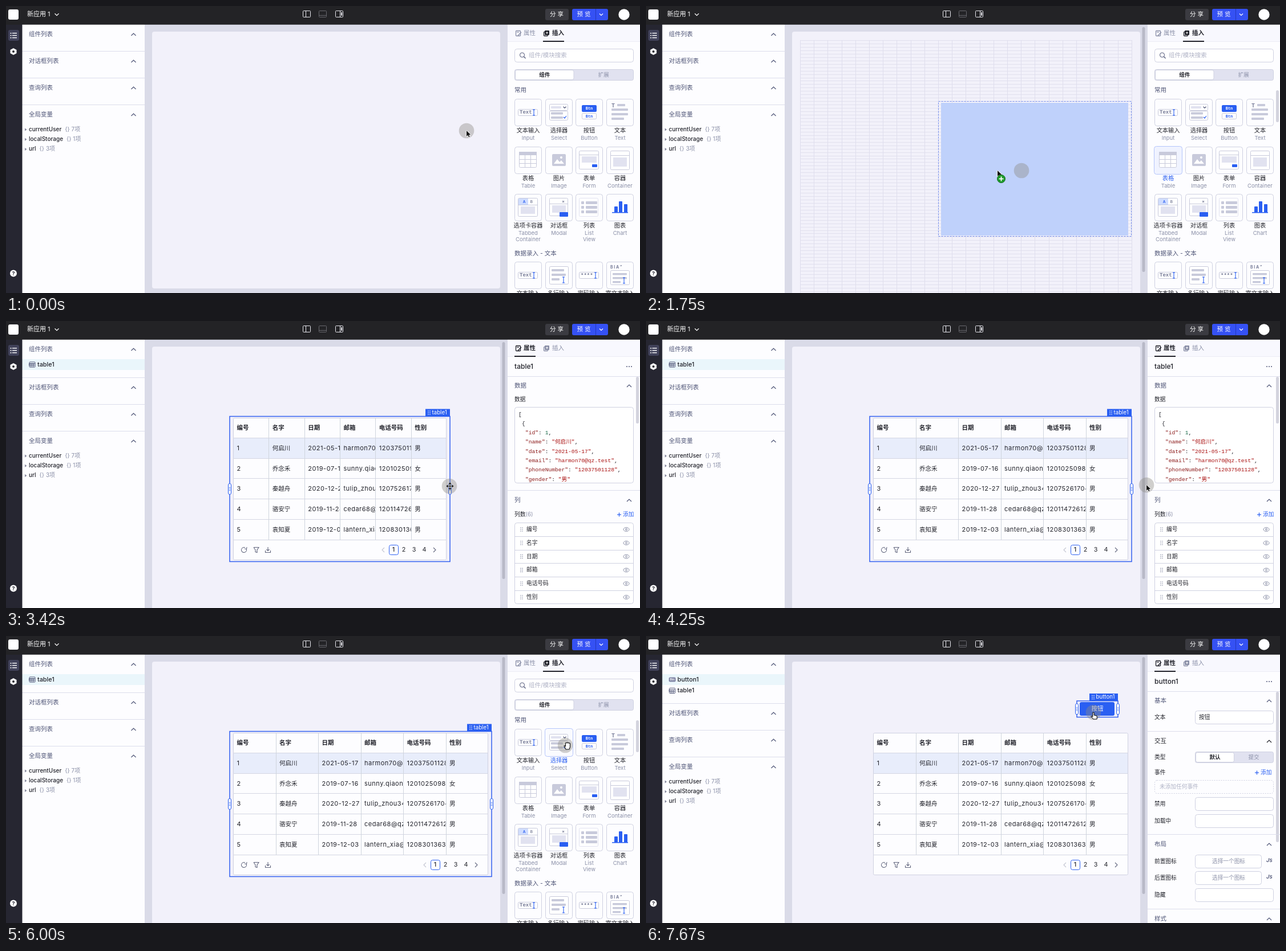
These frames come from a looping animation (1111x504 px, 8 s). An HTML page with a canvas:

```html
<!DOCTYPE html>
<html lang="zh-CN">
<head>
<meta charset="utf-8">
<style>
  html, body { margin: 0; overflow: hidden; background: #fdfdff; }
  canvas { display: block; }
</style>
</head>
<body>
<canvas id="stage" width="1111" height="504"></canvas>
<script>
const ctx = document.getElementById('stage').getContext('2d');
const SANS = 'Inter, "Noto Sans CJK SC", sans-serif';
const MONO = '"Liberation Mono", "Noto Sans CJK SC", monospace';
const WHITE = '#fdfdff', INK = '#22232b', SLATE = '#4f5577', MUTED = '#8b90a8', FAINT = '#b0b3c6';
const RULE = '#dcddeb', EDGE = '#cfd1e1', ICON = '#c8cadb', BLUE = '#2a5ff2', PALE = '#e1e2f0';
const FPS = 12, STEPS = 96, COL = 24.2, ROW = 5.956, GRID_X = 270, GRID_Y = 60, TABLE_Y = 168;

// ---- drawing helpers ----
function box(x, y, w, h, fill, stroke, r = 0, lw = 1) {
  ctx.beginPath();
  if (stroke) ctx.roundRect(x + .5, y + .5, w - 1, h - 1, r);
  else ctx.roundRect(x, y, w, h, r);
  if (fill) { ctx.fillStyle = fill; ctx.fill(); }
  if (stroke) { ctx.strokeStyle = stroke; ctx.lineWidth = lw; ctx.stroke(); }
}
function line(color, lw, ...p) {
  ctx.beginPath();
  for (let i = 0; i < p.length; i += 2) ctx.lineTo(p[i], p[i + 1]);
  ctx.strokeStyle = color; ctx.lineWidth = lw; ctx.stroke();
}
function poly(color, ...p) {
  ctx.beginPath();
  for (let i = 0; i < p.length; i += 2) ctx.lineTo(p[i], p[i + 1]);
  ctx.fillStyle = color; ctx.fill();
}
function disc(x, y, r, fill, stroke) {
  ctx.beginPath(); ctx.arc(x, y, r, 0, 7);
  if (fill) { ctx.fillStyle = fill; ctx.fill(); }
  if (stroke) { ctx.strokeStyle = stroke; ctx.lineWidth = 1; ctx.stroke(); }
}
function text(s, x, y, color = INK, size = 10.5, weight = 400, align = 'left', family = SANS) {
  ctx.font = `${weight} ${size}px ${family}`;
  ctx.textAlign = align; ctx.textBaseline = 'middle';
  ctx.fillStyle = color; ctx.fillText(s, x, y);
  return x + ctx.measureText(s).width;
}
function clipped(x, y, w, h, draw) {
  ctx.save(); ctx.beginPath(); ctx.rect(x, y, w, h); ctx.clip(); draw(); ctx.restore();
}
function dashed(x, y, w, h, color, r, pattern) {
  ctx.setLineDash(pattern); box(x, y, w, h, null, color, r); ctx.setLineDash([]);
}
const up = (x, y, color = SLATE) => line(color, 1.2, x - 4, y + 2, x, y - 2, x + 4, y + 2);
const down = (x, y, color, s = 3.5) => line(color, 1.2, x - s, y - s / 2, x, y + s / 2, x + s, y - s / 2);
const bars = (color, h, ...p) => { for (let i = 0; i < p.length; i += 3) box(p[i], p[i + 1], p[i + 2], h, color, null, 1); };
function grip(x, y, color) {
  for (let i = 0; i < 6; i++) disc(x + (i % 2) * 3, y - 3 + (i >> 1) * 3, .8, color);
}
function caret(x, y) {
  line(BLUE, 1.1, x, y - 5, x, y + 5);
  line(BLUE, 1.1, x - 2, y - 5, x + 2, y - 5);
  line(BLUE, 1.1, x - 2, y + 5, x + 2, y + 5);
}
function tableIcon(x, y) {
  box(x - 5, y - 5, 11, 10, null, SLATE, 1);
  line(SLATE, 1, x - 5, y - 1.5, x + 5, y - 1.5, x - 5, y - 1.5, x - 5, y + 1.5, x + 5, y + 1.5);
  line(SLATE, 1, x - 1.5, y - 2, x - 1.5, y + 4); line(SLATE, 1, x + 2, y - 2, x + 2, y + 4);
}

// ---- motion: cursor keys are [step, x, y] ----
const KEYS = [
  [10, 807, 219], [14, 915, 270], [15, 910, 270], [20, 658, 289], [21, 616, 289], [22, 564, 288],
  [26, 564, 288], [32, 731, 290], [38, 731, 290], [40, 777, 290], [41, 778, 290], [46, 851, 290],
  [50, 877, 288], [53, 877, 288], [60, 965, 50], [62, 965, 50], [66, 975, 188], [67, 975, 188],
  [71, 980, 192], [72, 983, 192], [75, 1020, 186], [80, 821, 149], [81, 807, 143], [84, 791, 129],
  [88, 791, 129], [91, 784, 134], [96, 784, 134]];
const POINTERS = [[0, 'arrow'], [14, 'grab'], [16, 'drag'], [26, 'arrow'], [34, 'move'], [47, 'arrow'],
  [59, 'point'], [63, 'arrow'], [65, 'grab'], [76, 'drag'], [86, 'point']];
const PAUSES = { 22: 21, 23: 25, 24: 25, 73: 72, 82: 81 };

function cursorAt(q) {
  const i = KEYS.findIndex(k => k[0] >= q);
  if (i < 1) return KEYS[0].slice(1);
  const [a, x, y] = KEYS[i - 1], [b, u, v] = KEYS[i], f = (q - a) / (b - a);
  return [x + (u - x) * f, y + (v - y) * f];
}
// Drop area: centred on the trailing cursor, snapped to the grid.
function dropArea(q, cols, rows) {
  const [x, y] = cursorAt(q - 2);
  if (x > 866) return null;
  let col = Math.floor((x - cols * COL / 2 - GRID_X) / COL);
  if (cols > 3) col = Math.min(col, 24 - cols);
  const row = Math.round((y - GRID_Y) / ROW - rows / 2);
  const left = Math.round(GRID_X + col * COL), top = Math.round(GRID_Y + row * ROW);
  return { x: left, y: top, w: Math.round(Math.min(cols, 24 - col) * COL), h: Math.round(rows * ROW) };
}

// ---- frame of the editor ----
function topBar() {
  box(0, 0, 1111, 32.75, '#232326');
  box(4, 6, 18, 18, '#fff', null, 3);
  text('新应用 1', 37, 15, '#fff', 11); down(89, 15, '#fff');
  box(520, 8, 14, 12, null, '#e8e8ee', 1); line('#e8e8ee', 1, 525.5, 8, 525.5, 20);
  box(548, 8, 14, 12, null, '#68686e', 1); line('#68686e', 1, 548, 16.5, 562, 16.5);
  box(577, 8, 14, 12, null, '#e8e8ee', 1); line('#e8e8ee', 1, 585.5, 8, 585.5, 20); box(587, 11, 2, 6, '#e8e8ee');
  box(945, 5, 41, 20, '#3b3b41', null, 3); text('分 享', 965, 15, '#fff', 10.5, 400, 'center');
  box(992, 5, 63, 20, '#3551f4', null, 3); box(1033, 5, 1, 20, '#2338bd');
  text('预 览', 1012.5, 15, '#fff', 10.5, 400, 'center'); down(1043, 15, '#fff', 3);
  disc(1083, 15, 9.7, '#fff');
}
function rail() {
  box(0, 32, 28.5, 472, '#262631');
  box(4, 42, 19, 19, '#41425a', null, 3);
  for (const y of [47, 51, 55]) { box(11, y, 8, 1.4, '#fff'); box(7.5, y, 2, 1.6, '#fff'); }
  poly('#fff', 13, 74, 18.5, 77, 18.5, 83, 13, 86, 7.5, 83, 7.5, 77); disc(13, 80, 2, '#262631');
  disc(13, 469.5, 6, '#fff'); text('?', 13, 470, '#262631', 9, 700, 'center');
}
function outline(items) {
  box(28, 32, 215, 472, WHITE);
  const shift = Math.round(items.length * 19.5);
  ['组件列表', '对话框列表', '查询列表', '全局变量'].forEach((name, i) => {
    const y = 50 + i * 47 + (i && shift);
    text(name, 40, y, SLATE); up(223.5, y);
    if (i) box(28, y - 18, 215, 1, RULE);
  });
  items.forEach((name, i) => {
    const y = 76.5 + i * 19.5;
    if (!i) box(28, 67, 215, 19, '#eaf6fb');
    if (name === 'table1') tableIcon(45.5, y);
    else { box(40, y - 4, 12, 8, '#8388a8', null, 2); text('Btn', 46, y, '#fff', 5, 600, 'center'); }
    text(name, 55, y, INK, 10.8, 500);
  });
  [['currentUser', 7], ['localStorage', 1], ['url', 3]].forEach(([name, n], i) => {
    const y = 217 + i * 17.2 + shift;
    poly('#8a8ca0', 33, y - 2.5, 36.5, y, 33, y + 2.5);
    text(`{} ${n}项`, text(name, 40, y, INK, 10, 500) + 6, y, MUTED, 10);
  });
}
function canvasArea(q) {
  box(243, 32, 636, 472, '#dadbe8');
  const long = q >= 16, dragging = (q >= 16 && q < 26) || (q >= 77 && q < 86);
  box(256, 45, 610, long ? 470 : 451, '#f2f1fa', null, 4);
  if (long) box(869.5, 37, 5, q < 26 ? 430 : dragging ? 410 : 416, '#b8b9c7', null, 2.5);
  if (!dragging) return;
  for (let y = GRID_Y; y < 504; y += ROW) box(GRID_X, Math.round(y), 581, 1, '#e1e0ee');
  for (let i = 0; i <= 24; i++) box(Math.round(GRID_X + i * COL), GRID_Y, 1, 444, '#dfdeed');
}
function dropHint(d) {
  box(d.x + 5, d.y + 3, d.w - 11, d.h - 5, '#bfd1fb');
  dashed(d.x, d.y, d.w, d.h, '#6f8bee', 0, [3, 2]);
}
function handle(x, y) {
  box(x - 3, y - 10, 6, 20, '#fff', BLUE, 2.5);
  for (const d of [-2.5, 0, 2.5]) line(BLUE, .8, x - 1.3, y + d, x + 1.3, y + d);
}
function selection(name, x, y, x1, h) {
  const w = name.length > 6 ? 50 : 43;
  ctx.strokeStyle = '#3360ef'; ctx.lineWidth = 1.5; ctx.strokeRect(x, y, x1 - x, h);
  box(x1 - w, y - 13, w, 13, BLUE);
  grip(x1 - w + 5, y - 6.5, '#fff'); text(name, x1 - w + 11.5, y - 6.5, '#fff', 9.7);
  handle(x, y + h / 2); handle(x1, y + h / 2);
}

const COLUMNS = ['编号', '名字', '日期', '邮箱', '电话号码', '性别'];
const PEOPLE = [
  ['1', '何启川', '2021-05-17', 'harmon70@qz.test', '12037501128', '男'],
  ['2', '乔念禾', '2019-07-16', 'sunny.qiaonianhe@qz.test', '12010250986', '女'],
  ['3', '秦越舟', '2020-12-27', 'tulip_zhou34@qz.test', '12075261704', '男'],
  ['4', '骆安宁', '2019-11-28', 'cedar68@qz.test', '12011472612', '男'],
  ['5', '袁知夏', '2019-12-03', 'lantern_xia@qz.test', '12083013636', '男']];

function dataTable(x1, y0, selected) {
  const x = 398, w = x1 - 6 - x, y = y0 + 2, cw = w / 6, h = 35.75;
  box(x, y, w, 250, WHITE, EDGE, 2);
  box(x + 1, y + h, w - 2, h, '#e8edfb');
  [COLUMNS, ...PEOPLE].forEach((row, r) => {
    row.forEach((s, i) => clipped(x + i * cw, y, cw, 250, () => {
      const latin = /^[ -~]+$/.test(s);
      if (latin) ctx.letterSpacing = '0.5px';
      text(s, x + i * cw + 6.5, y + (r + .5) * h, INK, latin ? 11 : 10.5, r ? 400 : 600);
    }));
    box(x, Math.round(y + (r + 1) * h) - 1, w, 1, '#d4d6e3');
  });
  for (let i = 1; i < 6; i++) box(Math.round(x + i * cw), y, 1, h * 6, '#cfd5dd');
  const f = y0 + 234, gray = '#62667e';
  ctx.beginPath(); ctx.arc(417, f, 4.5, -.3, 5.2); ctx.strokeStyle = gray; ctx.lineWidth = 1.1; ctx.stroke();
  line(gray, 1.1, 422, f - 5, 421.5, f - 1.5, 418, f - 2);
  line(gray, 1.1, 434, f - 4.5, 443, f - 4.5, 440, f, 440, f + 4.5, 437, f + 3.5, 437, f, 434, f - 4.5);
  line(gray, 1.1, 454.5, f + 1, 454.5, f + 4.5, 463.5, f + 4.5, 463.5, f + 1);
  line(gray, 1.1, 459, f - 5, 459, f + 1); line(gray, 1.1, 456.5, f - 1, 459, f + 1.5, 461.5, f - 1);
  line('#c3c5d2', 1.1, x1 - 115, f - 4, x1 - 119, f, x1 - 115, f + 4);
  box(x1 - 107, f - 9, 17, 18, '#fff', BLUE, 3);
  for (let i = 1; i < 5; i++) text(i, x1 - 117 + i * 18, f, INK, 10.8, i === 1 ? 500 : 400, 'center');
  line(gray, 1.1, x1 - 29, f - 4, x1 - 25, f, x1 - 29, f + 4);
  if (selected) selection('table1', 392, y0 - .5, x1, 255);
}

// ---- right panel ----
const mono = (s, x, y, color, size, align) => text(s, x, y, color, size, 700, align, MONO);
const windowFrame = (x, y, w, h, bar) => { box(x, y, w, h, '#fff', ICON, 2); box(x, y + bar, w, 1, ICON); };
const ICONS = {
  input() { box(6, 18, 35, 12, '#fff', ICON, 2); mono('Text', 9, 24, '#777c98', 9); caret(34, 24); },
  select() {
    box(7, 9, 33, 12, '#fff', ICON, 2); bars(PALE, 4, 10, 13, 18); down(34, 15, SLATE, 2.5);
    box(7, 21, 33, 17, '#fff', ICON, 2); bars(ICON, 4, 10, 23.5, 21, 10, 31, 21);
    line(BLUE, 1.2, 32, 32, 34, 34, 37, 30);
  },
  button() {
    box(11, 11, 26, 12, BLUE, null, 2); mono('Btn', 24, 17, '#fff', 7, 'center');
    box(11, 25, 26, 11, '#fff', ICON, 2); mono('Btn', 24, 31, BLUE, 7, 'center');
  },
  text() { text('T', 9, 12, '#777c98', 9, 700); bars(ICON, 4, 19, 9, 14, 9, 17, 29, 9, 25, 29, 9, 33, 22); },
  table() {
    box(8, 9, 31, 28, '#fff', ICON, 2); box(8, 9, 31, 6, ICON);
    for (const y of [22, 29]) box(8, y, 31, 1, ICON);
    for (const x of [18, 28]) box(x, 9, 1, 28, ICON);
  },
  image() { box(12, 13, 24, 21, ICON, null, 2); poly('#fff', 15, 30, 21, 22, 25, 27, 28, 24, 33, 30); disc(28, 19, 2, '#fff'); },
  form() { windowFrame(6, 7, 35, 33, 7); box(11, 17, 26, 11, PALE); box(29, 31, 9, 5, BLUE, null, 1); },
  container() { windowFrame(7, 7, 34, 34, 8); box(12, 19, 24, 16, PALE); },
  tabs() {
    windowFrame(6, 7, 35, 33, 12); box(7, 8, 17, 11, '#cfdcff');
    text('A', 17, 14, BLUE, 6.5, 600, 'center'); text('B', 30, 14, SLATE, 6.5, 400, 'center'); box(11, 22, 25, 13, PALE);
  },
  modal() {
    windowFrame(7, 7, 33, 32, 10); line(SLATE, 1, 30, 12, 33, 15); line(SLATE, 1, 33, 12, 30, 15);
    box(12, 20, 24, 13, PALE); box(25, 32, 15, 8, BLUE, null, 1);
  },
  list() { box(6, 7, 34, 33, '#fff', PALE, 2); for (const y of [13, 21, 29]) bars(ICON, 5, 10, y, 5, 18, y, 20); },
  chart() { box(10, 32, 28, 1.5, BLUE); [[14, 22], [22, 13], [31, 18]].forEach(([x, y]) => box(x, y, 6, 33 - y, BLUE, null, 1)); },
  area() { box(7, 8, 34, 32, '#fff', ICON, 2); bars(ICON, 4, 11, 13, 22, 11, 21, 25, 11, 29, 14); caret(32, 32); },
  password() { box(6, 18, 35, 12, '#fff', ICON, 2); mono('****', 9, 25, '#777c98', 9); caret(35, 24); },
  rich() { text('B I A ”', 7, 10, '#777c98', 7, 700); box(7, 15, 34, 26, '#fff', ICON, 2); bars(ICON, 3.5, 11, 20, 25, 11, 27, 25, 11, 34, 14); caret(31, 33); }
};
const TILES = [
  ['input', '文本输入', 'Input'], ['select', '选择器', 'Select'], ['button', '按钮', 'Button'], ['text', '文本', 'Text'],
  ['table', '表格', 'Table'], ['image', '图片', 'Image'], ['form', '表单', 'Form'], ['container', '容器', 'Container'],
  ['tabs', '选项卡容器', 'Tabbed Container'], ['modal', '对话框', 'Modal'], ['list', '列表', 'List View'], ['chart', '图表', 'Chart'],
  ['input', '文本输入', ''], ['area', '多行输入', ''], ['password', '密码输入', ''], ['rich', '富文本输入', '']];

function segmented(x, y, w, a, b) {
  box(x, y, w, 20, PALE, EDGE, 3); box(x + 1, y + 1, w / 2 - 1, 18, '#fff', EDGE, 3);
  text(a, x + w / 4 + .5, y + 10, INK, 9.5, 600, 'center'); text(b, x + w * .75 - .5, y + 10, MUTED, 9.5, 400, 'center');
}
function panelShell(insert, bar) {
  box(879, 32, 232, 472, WHITE); box(879, 32, 232, 30, '#f8f8fe'); box(879, 62, 232, 1, '#ededf5');
  const a = insert ? MUTED : INK, b = insert ? INK : MUTED;
  box(893, 43, 9, 10, null, a, 1, 1.3); line(a, 1.2, 895, 46, 899, 46); line(a, 1.5, 897, 52, 903, 46);
  text('属性', 907, 48, a, 10.5, insert ? 400 : 600);
  box(942, 45, 8, 8, null, b, 1, 1.3); box(944, 43, 8, 8, b, null, 1);
  line('#fff', 1, 946, 47, 950, 47); line('#fff', 1, 948, 45, 948, 49);
  text('插入', 957, 48, b, 10.5, insert ? 600 : 400);
  box(insert ? 941 : 891, 61, 37, 2, INK);
  if (bar) box(1104, bar[0], 5, bar[1] - bar[0], '#d3d3de', null, 2.5);
}
function insertPanel(active, pressed, scrolled) {
  panelShell(true, scrolled && [148, 204]);
  box(891, 75, 209, 24, '#fff', EDGE, 4);
  disc(904.5, 86, 4, null, SLATE); line(SLATE, 1.2, 907.5, 89, 910.5, 92);
  text('组件/模块搜索', 916, 87, FAINT);
  segmented(891, 111, 209, '组件', '扩展');
  text('常用', 891, 148, SLATE); text('数据录入 - 文本', 891, 435, SLATE);
  TILES.forEach(([icon, name, en], i) => {
    const row = i >> 2, x = Math.round(891 + (i % 4) * 53.6), y = row < 3 ? Math.round(163 + row * 83.5) : 449;
    const on = i === active;
    ctx.save(); ctx.translate(x, y);
    if (on) box(-1, -1, 50, 50, pressed ? '#f0f3ff' : '#fafbff', '#b4c5fb', 4);
    else box(0, 0, 48, 48, WHITE, EDGE, 4);
    ICONS[icon]();
    text(name, 24, 55.5, on ? BLUE : INK, 10.2, 400, 'center');
    en.split(' ').forEach((s, k) => text(s, 24, 69.5 + k * 10.5, MUTED, 9.5, 400, 'center'));
    ctx.restore();
  });
}
function section(name, y, color = SLATE, ruleY) {
  if (ruleY) box(879, ruleY, 232, 1, RULE);
  text(name, 891, y, color); up(1092, y, color);
}
function propsHead(name, bar) {
  panelShell(false, bar);
  text(name, 891, 80, INK, 12, 500);
  for (const x of [1088, 1092, 1096]) disc(x, 80, 1, SLATE);
}
function addLink(x, y) {
  line(BLUE, 1.2, x, y, x + 7, y); line(BLUE, 1.2, x + 3.5, y - 3.5, x + 3.5, y + 3.5);
  text('添加', x + 10, y, BLUE, 9.7);
}
function tableProps() {
  propsHead('table1', [98, 180]);
  section('数据', 114, SLATE, 97); text('数据', 891, 138, INK, 9.7);
  box(891, 151, 209, 134, '#fff', EDGE, 4);
  const code = (s, x, y, color = INK) => text(s, x, y, color, 9.65, 400, 'left', MONO);
  const [id, name, date, email, phone, sex] = PEOPLE[0];
  clipped(892, 152, 207, 132, () => {
    code('[', 898, 164); code('{', 904, 180.3);
    Object.entries({ id: +id, name, date, email, phoneNumber: phone, gender: sex }).forEach(([key, value], i, all) => {
      const y = 196.5 + i * 16.3;
      let x = code(': ', code(`"${key}"`, 910, y, '#8c1a1a'), y);
      x = code(JSON.stringify(value), x, y, i ? '#a11' : '#164');
      if (i < all.length - 1) code(',', x, y);
    });
  });
  section('列', 315, SLATE, 297);
  text('(6)', text('列数', 891, 340, INK, 9.7), 340, MUTED, 9.7); addLink(1071, 340);
  box(891, 354, 209, 143, '#fff', EDGE, 4);
  COLUMNS.forEach((name, i) => {
    const y = 366 + i * 23.8;
    if (i) box(891, Math.round(y - 12), 209, 1, EDGE);
    grip(902, y, MUTED); text(name, 912, y, INK, 9.7);
    ctx.beginPath(); ctx.ellipse(1087, y, 5, 3.4, 0, 0, 7); ctx.strokeStyle = MUTED; ctx.lineWidth = 1; ctx.stroke();
    disc(1087, y, 1.5, null, MUTED);
  });
}
function buttonProps() {
  propsHead('button1', [98, 362]);
  const field = (name, y, value, w = 138) => {
    text(name, 891, y, INK, 9.7);
    box(962, y - 12, w, 24, '#fff', EDGE, 4);
    if (w < 138) { text('选择一个图标', 1021, y, MUTED, 9.7, 400, 'center'); text('Js', 1087, y - 2, SLATE, 9.5, 'italic 600'); }
    else if (value) text(value, 969, y, INK, 9.7);
  };
  section('基本', 114, SLATE, 97); field('文本', 143, '按钮');
  section('交互', 185, INK, 167);
  text('类型', 891, 213, INK, 9.7); segmented(962, 203, 138, '默认', '提交');
  text('事件', 891, 240, INK, 9.7); addLink(1067, 240);
  dashed(891, 253, 209, 24, EDGE, 4, [2, 2]); text('未添加任何事件', 900, 265, FAINT, 9.7);
  field('禁用', 295); field('加载中', 325);
  section('布局', 366, SLATE, 348);
  field('前置图标', 396, '', 117); field('后置图标', 425, '', 117); field('隐藏', 455);
  section('样式', 497, SLATE, 479);
}

// ---- pointer ----
const HANDS = {
  point: new Path2D('M-1.2 1.2a1.2 1.2 0 0 1 2.4 0V5l4 1q1.3.4 1.2 2L6 12H0L-4 7.5q.5-1.6 2.8.2z'),
  grab: new Path2D('M-5 1q1.5-1 2.5 1V-4q1-1.5 2 0q1-2 2 0q1-1.6 2 .3q1-1 2 .5V3L4 7H-2z')
};
function pointer(kind, x, y) {
  ctx.save(); ctx.translate(x, y);
  ctx.lineJoin = 'round';
  if (HANDS[kind]) {
    ctx.fillStyle = '#fff'; ctx.fill(HANDS[kind]);
    ctx.strokeStyle = '#111'; ctx.lineWidth = 1.1; ctx.stroke(HANDS[kind]);
  } else if (kind === 'move') {
    for (const [c, w] of [['#fff', 3], ['#111', 1.2]]) { line(c, w, -5, 0, 5, 0); line(c, w, 0, -5, 0, 5); }
    for (let i = 0; i < 4; i++) { ctx.rotate(Math.PI / 2); poly('#111', 6.5, 0, 3.5, -2.5, 3.5, 2.5); }
  } else {
    const arrow = [0, 0, 0, 10, 2.4, 7.8, 4, 11.2, 5.6, 10.4, 4.1, 7.2, 7.2, 7, 0, 0];
    line('#fff', 1.6, ...arrow); poly('#111', ...arrow);
    if (kind === 'drag') {
      disc(6.5, 14.5, 7, '#1f9a2c', '#12701c');
      line('#fff', 1.8, 2.5, 14.5, 10.5, 14.5); line('#fff', 1.8, 6.5, 10.5, 6.5, 18.5);
    }
  }
  ctx.restore();
}

function render(step) {
  const q = PAUSES[step] ?? step, [x, y] = cursorAt(q);
  const hasTable = q >= 26, hasButton = q >= 86;
  canvasArea(q);
  const drop = q >= 16 && q < 26 ? dropArea(q, 14, 40) : q >= 77 && !hasButton ? dropArea(q, 3, 5) : null;
  if (drop) dropHint(drop);
  if (hasTable) {
    const right = q < 39 ? 731 : q < 46 ? GRID_X + Math.round((x - GRID_X) / COL) * COL : 851;
    const pushed = drop ? Math.max(0, drop.y + drop.h + 1 - TABLE_Y) : 0;
    dataTable(Math.round(right), TABLE_Y + Math.floor(pushed / ROW) * 6, !hasButton);
  }
  if (hasButton) {
    box(760, 116, 61, 24, BLUE, null, 3); text('按钮', 791, 128, '#fff', 10.5, 400, 'center');
    selection('button1', 755, 114, 827, 28.5);
  }
  outline(hasButton ? ['button1', 'table1'] : hasTable ? ['table1'] : []);
  if (hasButton) buttonProps();
  else if (hasTable && q < 61) tableProps();
  else {
    const active = q >= 75 ? 2 : q >= 65 ? 1 : q >= 14 && q < 26 ? 4 : -1;
    insertPanel(active, active !== 1, q >= 13);
  }
  rail(); topBar();
  const [rx, ry] = cursorAt(q - 1);
  disc(rx, ry, 13.3, 'rgba(140,138,130,.4)');
  pointer(POINTERS.findLast(p => p[0] <= q)[1], x, y);
}

const start = performance.now();
function tick() {
  render(Math.floor((performance.now() - start) * FPS / 1000 + .05) % STEPS);
  requestAnimationFrame(tick);
}
tick();
</script>
</body>
</html>
```
